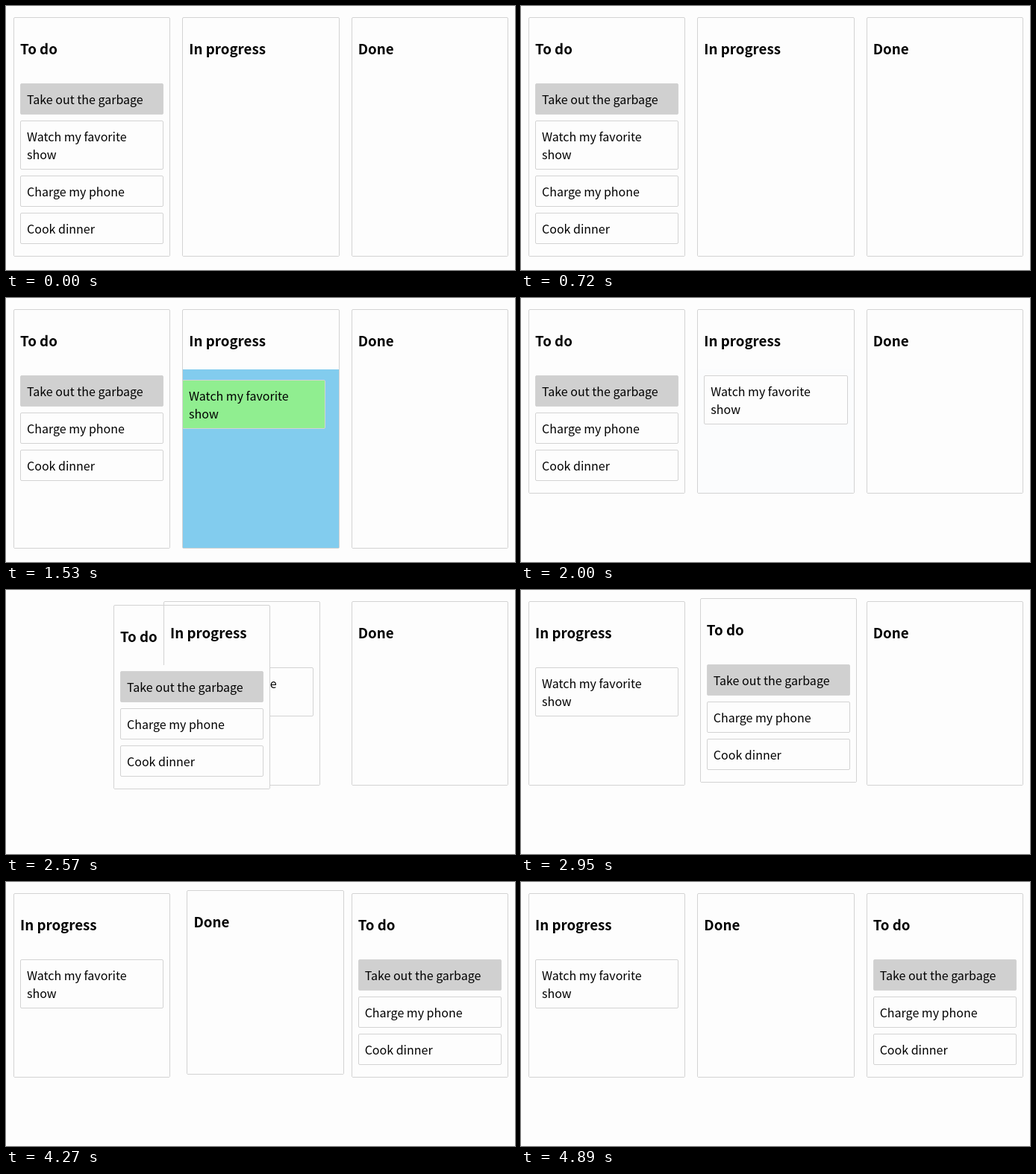
Animation of 682 by 355 pixels, one loop 6510 ms. Source, as an HTML page:

```html
<!DOCTYPE html>
<html lang="en">
<head>
<meta charset="utf-8">
<title>Task board</title>
<style>
:root {
  --paper: #fdfdfd;
  --line: #d3d3d3;
  --muted: #d0d0d0;
  --over: #82ccee;
  --drag: #90ee90;
  --slot1: 10px;
  --slot2: 236.33px;
  --slot3: 462.67px;
  --loop: 6510ms infinite;
}
html, body {
  margin: 0;
  width: 100%;
  height: 100%;
  overflow: hidden;
  background: var(--paper);
}
body {
  position: relative;
  font: 16px/24px "Noto Sans CJK JP", "Noto Sans CJK SC", "Noto Sans CJK", sans-serif;
  color: #000;
}
.column {
  position: absolute;
  top: 15px;
  z-index: 0;
  box-sizing: border-box;
  width: 210.33px;
  height: 322px;
  display: flex;
  flex-direction: column;
  border: 1px solid var(--line);
  border-radius: 2px;
}
h3 {
  margin: 19px 0 18px;
  padding: 8px;
  font-size: 18.72px;
  line-height: 27px;
}
.list {
  flex: 1;
  padding: 8px;
  background: var(--paper);
}
.card {
  margin-bottom: 8px;
  padding: 8px;
  border: 1px solid var(--line);
  border-radius: 2px;
  background: var(--paper);
}
.locked { background: var(--muted); }
.rest, .watch { position: relative; }

#todo { animation: todo-move var(--loop) linear, todo-lift var(--loop) step-end, shrink var(--loop) step-end; }
#todo .list { animation: todo-over var(--loop) ease; }
#progress { animation: progress-move var(--loop) linear, shrink var(--loop) step-end; }
#progress .list { animation: progress-over var(--loop) ease; }
#done { animation: done-move var(--loop) linear, done-lift var(--loop) step-end, shrink var(--loop) step-end; }
.rest { animation: close-gap var(--loop) linear; }
.watch { animation: watch-move var(--loop) linear, watch-tint var(--loop) step-end; }

/* Easings: (.2, 0, 0, 1) makes room, (.2, 1, .1, 1) settles a drop. */

/* card drag: 1150 to 1830 ms */
@keyframes watch-move {
  0%, 17.665% { left: -226.33px; top: 50px; animation-timing-function: cubic-bezier(.3, .1, .7, .8); }
  19.355% { left: -128.33px; top: 69px; animation-timing-function: cubic-bezier(.3, .5, .6, 1); }
  23.041% { left: -18px; top: 11.5px; animation-timing-function: cubic-bezier(.2, 1, .1, 1); }
  28.111%, 100% { left: 0; top: 0; }
}
@keyframes watch-tint {
  0% { background: var(--paper); }
  17.75% { background: var(--drag); }
  28.111%, 100% { background: var(--paper); }
}
@keyframes close-gap {
  0%, 19.585% { top: 74px; animation-timing-function: cubic-bezier(.2, 0, 0, 1); }
  22.657%, 100% { top: 0; }
}
@keyframes todo-over {
  0%, 17.665% { background: var(--paper); }
  19.585% { background: #92d3f0; }
  22.657%, 100% { background: var(--paper); }
}
@keyframes progress-over {
  0%, 19.816% { background: var(--paper); }
  22.888%, 28.111% { background: var(--over); }
  31.183%, 100% { background: var(--paper); }
}
@keyframes shrink {
  0% { height: 322px; }
  28.111%, 100% { height: 248px; }
}

/* first column drag: 2290 to 3265 ms */
@keyframes todo-move {
  0%, 35.1% { left: var(--slot1); top: 15px; animation-timing-function: cubic-bezier(.4, 0, .8, .8); }
  39.478% { left: 143.4px; top: 20px; animation-timing-function: cubic-bezier(.3, .4, .7, 1); }
  42.243% { left: 225px; top: 22px; animation-timing-function: ease-in-out; }
  45.084% { left: 241px; top: 10px; animation-timing-function: cubic-bezier(.2, 1, .1, 1); }
  50.154%, 62.058% { left: var(--slot2); top: 15px; animation-timing-function: cubic-bezier(.2, 0, 0, 1); }
  65.13%, 100% { left: var(--slot3); top: 15px; }
}
@keyframes todo-lift {
  0% { z-index: 0; }
  35.1% { z-index: 2; }
  50.154%, 100% { z-index: 0; }
}
@keyframes progress-move {
  0%, 39.225% { left: var(--slot2); animation-timing-function: cubic-bezier(.2, 0, 0, 1); }
  42.297%, 100% { left: var(--slot1); }
}

/* second column drag: 3860 to 4610 ms */
@keyframes done-move {
  0%, 59.3% { left: var(--slot3); top: 15px; animation-timing-function: cubic-bezier(.4, 0, .8, .8); }
  62.058% { left: 342px; top: 6px; animation-timing-function: cubic-bezier(.3, .5, .6, 1); }
  65.59%, 65.745% { left: 242.4px; top: 11px; animation-timing-function: cubic-bezier(.2, 1, .1, 1); }
  70.814%, 100% { left: var(--slot2); top: 15px; }
}
@keyframes done-lift {
  0% { z-index: 0; }
  59.3% { z-index: 2; }
  70.814%, 100% { z-index: 0; }
}
</style>
</head>
<body>
<section class="column" id="todo">
  <h3>To do</h3>
  <div class="list">
    <div class="card locked">Take out the garbage</div>
    <div class="rest">
      <div class="card">Charge my phone</div>
      <div class="card">Cook dinner</div>
    </div>
  </div>
</section>
<section class="column" id="progress">
  <h3>In progress</h3>
  <div class="list">
    <div class="card watch">Watch my favorite<br>show</div>
  </div>
</section>
<section class="column" id="done">
  <h3>Done</h3>
  <div class="list"></div>
</section>
</body>
</html>
```
